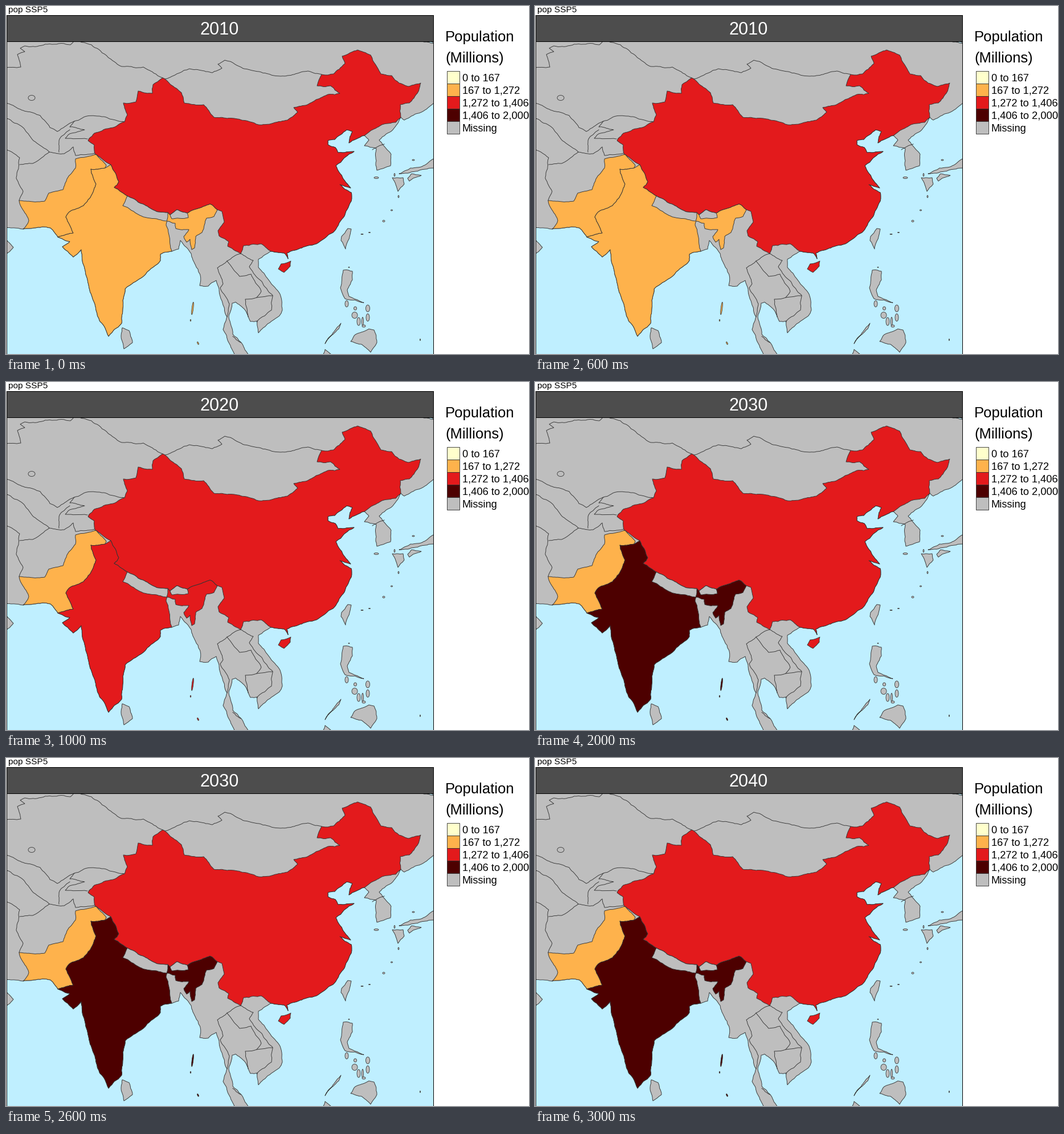
These frames come from a looping animation (918x610 px, 4 s). A matplotlib script:

```python
import numpy as np
import matplotlib.pyplot as plt
from matplotlib.animation import FuncAnimation
from matplotlib.patches import Ellipse, Polygon, Rectangle

W, H, DPI = 918, 610, 100
PT = 72 / DPI
SEA, LAND, EDGE = "#BFEFFF", "#BEBEBE", "#333333"
LOW, MID, HIGH, TOP = "#FFFFCC", "#FEB24C", "#E31A1C", "#4D0000"
YEARS = [(2010, MID), (2020, HIGH), (2030, TOP), (2040, TOP)]

rng = np.random.default_rng(5)
plt.rcParams["font.family"] = "Liberation Sans"
fig = plt.figure(figsize=(W / DPI, H / DPI), dpi=DPI, facecolor="white")
ax = fig.add_axes([0, 0, 1, 1])
ax.set(xlim=(0, W), ylim=(H, 0))
ax.axis("off")

panel = Rectangle((0.5, 15.5), 749, 594, fc=SEA, ec="none", zorder=0)
ax.add_patch(panel)


def ragged(a, b):
    """Split a span by random midpoint shifts; returns all points but the last."""
    length = np.hypot(*(b - a))
    if length < 5:
        return [a]
    mid = (a + b) / 2 + rng.uniform(-1, 1, 2) * min(0.07 * length, 1.5)
    return ragged(a, mid) + ragged(mid, b)


def arc(*xy):
    pts = np.reshape(xy, (-1, 2)).astype(float)
    out = [p for a, b in zip(pts, pts[1:]) for p in ragged(a, b)]
    return np.array(out + [pts[-1]])


def area(color, *arcs, z=2):
    shape = Polygon(np.vstack(arcs), fc=color, ec=EDGE, lw=0.9 * PT,
                    joinstyle="round", zorder=z)
    ax.add_patch(shape)
    shape.set_clip_path(panel)
    return shape


def border(*xy):
    line, = ax.plot(*arc(*xy).T, color=EDGE, lw=0.9 * PT, zorder=1.5)
    line.set_clip_path(panel)


def isle(color, x, y, w, h, angle=0):
    spot = Ellipse((x, y), w, h, angle=angle, fc=color, ec=EDGE, lw=0.8 * PT, zorder=2)
    ax.add_patch(spot)
    spot.set_clip_path(panel)
    return spot


def label(x, y, text, px, **style):
    return ax.text(x, y, text, size=px * PT, va="baseline", zorder=9, **style)


# China, clockwise from its western tip
china_inland = arc(
    146, 232, 155, 223, 188, 213, 208, 203, 213, 191, 206, 170, 228, 168, 232, 149, 257, 153,
    258, 138, 275, 126, 308, 152, 313, 170, 347, 173, 365, 195, 411, 199, 443, 208, 494, 200,
    512, 186, 505, 178, 526, 174, 565, 155, 586, 153, 570, 140, 546, 140, 554, 120, 575, 119,
    595, 101, 590, 88, 617, 77, 640, 86, 658, 119, 677, 122, 690, 135, 706, 141, 728, 135,
    722, 153, 708, 170, 692, 173, 693, 195, 684, 204, 660, 208, 629, 227)
china_coast = arc(
    629, 227, 602, 240, 608, 220, 598, 217, 577, 234, 565, 236, 565, 243, 578, 248, 583, 257,
    611, 255, 579, 280, 592, 303, 605, 319, 586, 313, 606, 327, 606, 342, 592, 371, 574, 397,
    548, 415, 493, 433, 495, 443, 488, 433, 465, 430)
china_indochina = arc(
    465, 430, 448, 417, 417, 420, 412, 434, 389, 421, 391, 413, 374, 403, 372, 394, 383, 379,
    379, 360, 371, 357)
arunachal = arc(371, 357, 358, 347, 318, 363)
bhutan_north = arc(318, 363, 300, 357, 288, 366)
nepal_north = arc(284, 362, 262, 359, 240, 347, 213, 333)
ladakh = arc(213, 333, 190, 318, 198, 308, 184, 278)
pamir = arc(184, 278, 171, 270, 156, 259, 155, 244, 144, 236)

# South Asia
pak_north = arc(122, 268, 158, 260, 176, 279, 174, 284)
pak_india = arc(174, 284, 149, 286, 158, 312, 151, 330, 136, 350, 111, 361, 105, 370, 118, 398,
                91, 405)
pak_coast = arc(30, 391, 60, 388, 78, 389, 91, 405)
pak_west = arc(30, 391, 40, 376, 23, 341, 68, 342, 75, 328, 100, 322, 107, 303, 122, 284,
               122, 268)
india_coast = arc(
    91, 405, 112, 413, 99, 422, 118, 440, 132, 427, 138, 460, 152, 513, 165, 553, 180, 579,
    190, 567, 203, 556, 205, 516, 209, 496, 241, 474, 271, 446, 271, 435, 291, 430)
bangladesh = arc(291, 430, 286, 401, 281, 384, 283, 377, 297, 381, 298, 390, 321, 392, 312, 404,
                 317, 414, 323, 409, 326, 427)
myanmar_india = arc(326, 427, 331, 424, 333, 404, 344, 397, 352, 372, 365, 369, 371, 357)

# Coasts of the remaining mainland
bengal_coast = arc(291, 430, 303, 426, 306, 411, 325, 434, 341, 472, 340, 490, 355, 491,
                   369, 481, 388, 545, 381, 567, 402, 612)
gulf_coast = arc(
    426, 612, 413, 590, 398, 575, 391, 545, 397, 521, 403, 519, 418, 531, 429, 553, 441, 552,
    443, 573, 480, 543, 485, 533, 481, 505, 443, 458, 443, 444, 465, 430)
east_coast = arc(
    629, 227, 637, 235, 629, 245, 650, 250, 649, 279, 651, 288, 675, 280, 676, 260, 655, 235,
    679, 217, 693, 195, 699, 200, 733, 184, 752, 169)
area(LAND, arc(-5, 387, 30, 391), pak_coast, india_coast, bengal_coast, gulf_coast,
     china_coast[::-1], east_coast, arc(755, 50, -5, 50), z=1)
area(SEA, arc(732, 55, 733, 63, 755, 67))

# Inland borders: north and Central Asia
border(0, 108, 26, 107, 20, 85, 33, 80, 25, 74, 33, 70, 92, 66, 113, 68, 119, 62, 150, 68,
       203, 106, 241, 107, 275, 126)
border(279, 128, 322, 110, 362, 117, 379, 109, 372, 102, 384, 95, 418, 110, 482, 123, 530, 114,
       554, 120)
border(0, 170, 20, 179, 60, 192, 77, 213, 90, 220, 120, 202, 142, 193, 172, 194, 208, 203)
border(120, 202, 112, 212, 138, 217, 109, 226, 104, 232, 143, 233)
border(112, 217, 94, 233, 93, 256)
border(0, 197, 31, 214, 48, 236, 76, 256, 47, 276, 24, 278)
border(76, 256, 102, 259, 118, 247, 122, 262, 155, 258)
border(0, 252, 24, 266, 18, 302, 30, 325, 23, 341)
# Indochina and Korea
border(412, 434, 388, 447, 371, 459, 381, 487, 376, 494, 392, 522, 388, 545)
border(388, 447, 410, 474, 430, 470, 448, 500, 440, 511, 420, 514, 425, 545)
border(412, 434, 434, 446, 427, 457, 468, 507, 466, 533, 440, 554)
border(440, 511, 468, 508)
border(398, 579, 412, 590)
border(643, 252, 664, 242)

# Coloured countries and their enclosed neighbours
area(MID, pak_north, pak_india, pak_coast[::-1], pak_west)
india = [area(MID, ladakh[::-1], nepal_north[::-1], bhutan_north[::-1], arunachal[::-1],
              myanmar_india[::-1], bangladesh[::-1], india_coast[::-1], pak_india[::-1])]
area(HIGH, china_inland, china_coast, china_indochina, arunachal, bhutan_north, nepal_north,
     ladakh, pamir)
area(LAND, nepal_north, arc(213, 333, 205, 350, 235, 367, 282, 377, 284, 362))
area(LAND, bhutan_north, arc(288, 366, 291, 373, 320, 371, 318, 363))
area(HIGH, arc(478, 461, 483, 452, 500, 447, 499, 456, 488, 467, 478, 461))
india += [isle(MID, 327.5, 530, 2.5, 22, 7), isle(MID, 324, 551, 1.5, 3),
          isle(MID, 337, 591, 2, 5, -25)]

# Other islands: Oman, Sri Lanka, Taiwan, Japan, the Philippines, Borneo
area(LAND, arc(-3, 406, 13, 423, -3, 439))
area(LAND, arc(204, 564, 216, 569, 222, 590, 207, 601, 202, 578, 204, 564))
area(LAND, arc(589, 404, 600, 390, 606, 391, 596, 426, 588, 411, 589, 404))
area(LAND, arc(678, 301, 697, 301, 699, 312, 688, 325, 678, 301))
area(LAND, arc(690, 294, 710, 284, 735, 279, 752, 267, 752, 284, 718, 290, 690, 294))
area(LAND, arc(705, 302, 712, 294, 729, 297, 708, 307, 705, 302))
area(LAND, arc(592, 463, 608, 465, 608, 480, 599, 498, 602, 509, 628, 520, 595, 513, 587, 494,
               592, 463))
area(LAND, arc(605, 588, 613, 576, 637, 566, 646, 568, 651, 590, 640, 607, 624, 593, 605, 588))
area(LAND, arc(560, 592, 566, 583, 588, 556, 584, 566, 560, 592))
area(LAND, arc(556, 613, 560, 602, 574, 613))

specks = [
    (45, 161, 12, 9), (650, 301, 8, 3), (682, 296, 2, 5), (715, 270, 4, 2), (663, 377, 4, 3),
    (677, 358, 3, 2), (625, 400, 4, 1), (638, 397, 3, 1), (598, 522, 6, 11), (612, 542, 10, 11),
    (619, 553, 6, 14), (626, 553, 3, 15), (635, 530, 7, 12), (635, 546, 6, 13), (628, 561, 6, 4),
    (613, 530, 5, 6), (602, 458, 2, 1), (689, 334, 2, 4), (727, 585, 1, 3),
]
for speck in specks:
    isle(LAND, *speck)

# Frame, header and legend
ax.add_patch(Rectangle((0.5, 15.5), 749, 46, fc="#4D4D4D", ec="black", lw=PT, zorder=7))
ax.add_patch(Rectangle((0.5, 15.5), 749, 594, fc="none", ec="black", lw=PT, zorder=8))
label(4, 11, "pop SSP5", 15.4)
year_text = label(375, 50, "", 30.6, color="white", ha="center")
label(771, 62, "Population", 25.6)
label(771, 99, "(Millions)", 25.6)
classes = [(LOW, "0 to 167"), (MID, "167 to 1,272"), (HIGH, "1,272 to 1,406"),
           (TOP, "1,406 to 2,000"), (LAND, "Missing")]
for i, (color, text) in enumerate(classes):
    y = 113.5 + 22 * i
    ax.add_patch(Rectangle((773.5, y), 22, 22, fc=color, ec=EDGE, lw=0.9 * PT))
    label(801, y + 18.3, text, 18.3)


def update(i):
    year, color = YEARS[i]
    year_text.set_text(str(year))
    for part in india:
        part.set_facecolor(color)
    return [year_text, *india]


anim = FuncAnimation(fig, update, frames=len(YEARS), interval=1000, repeat=True,
                     repeat_delay=0, blit=False)
plt.show()
```
